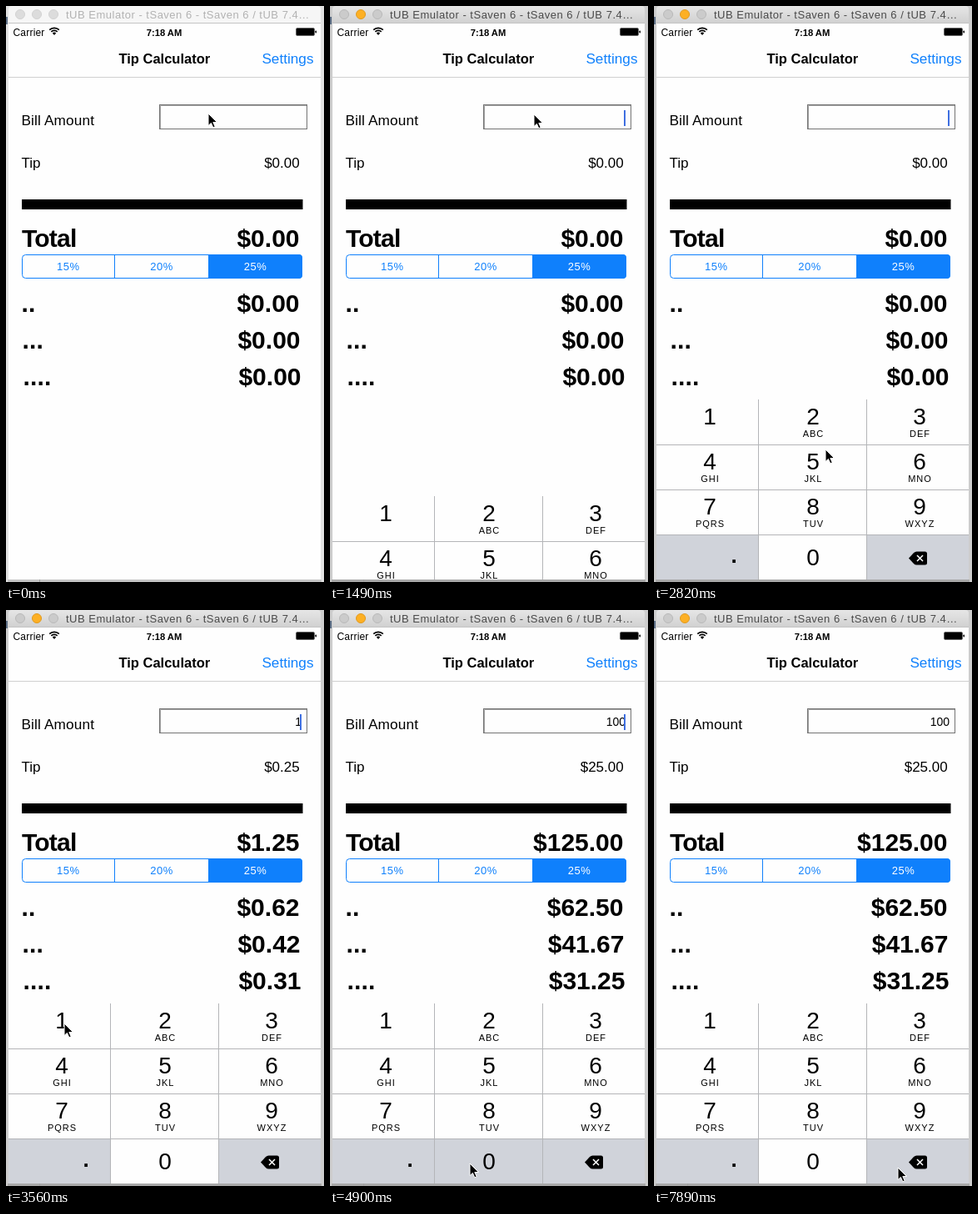
These frames come from a looping animation (382 by 691 pixels, 8 s). An HTML page:

```html
<!DOCTYPE html>
<html lang="en">
<head>
<meta charset="utf-8">
<title>Tip Calculator</title>
<style>
  html, body { margin: 0; width: 100%; height: 100%; overflow: hidden; background: #e6e6e6; }
  svg { display: block; width: 100vw; height: 100vh; }
  text { font-family: "Liberation Sans", Arial, sans-serif; font-size: 17px; white-space: pre; }
  .bold { font-weight: 700; }
  .big { font-weight: 700; font-size: 30px; }
  .end { text-anchor: end; }
  .mid { text-anchor: middle; }
  .seg { font-size: 13px; letter-spacing: .5px; }
  .digit { font-size: 28px; }
  .letters { font-size: 11px; letter-spacing: 1px; }
</style>
</head>
<body>
<svg id="stage" viewBox="0 0 382 691">
  <defs>
    <linearGradient id="bar" x1="0" y1="0" x2="0" y2="1">
      <stop offset="0" stop-color="#e6e6e6"/>
      <stop offset="1" stop-color="#d0d0d0"/>
    </linearGradient>
    <clipPath id="screen"><rect x="3" y="21" width="375" height="667"/></clipPath>
  </defs>
</svg>
<script>
const LOOP = 8000, STEP = 148.15;
const BLUE = '#0f80fc', KEY_GREY = '#d0d3da', LINE = '#b4b5b8', PAPER = '#fefefe';
const stage = document.getElementById('stage');

function add(parent, tag, attrs, content) {
  const el = document.createElementNS('http://www.w3.org/2000/svg', tag);
  for (const k in attrs) el.setAttribute(k, attrs[k]);
  if (content !== undefined) el.textContent = content;
  parent.appendChild(el);
  return el;
}
const rect = (p, x, y, width, height, fill, more) => add(p, 'rect', { x, y, width, height, fill, ...more });
const label = (p, x, y, cls, content, more) => add(p, 'text', { x, y, class: cls, ...more }, content);
const path = (p, d, more) => add(p, 'path', { d, ...more });

// Window frame
const backdrop = rect(stage, 0, 0, 382, 691, '#e6e6e6');
const shadow = rect(stage, 2, 688, 377, 3, '#c0c0c0');
rect(stage, 0, 13, 2, 9, '#5d6f86');
rect(stage, 40, 688, 1, 3, '#a0a0a0');
const titleBar = path(stage, 'M3 21V4a4 4 0 0 1 4-4H374a4 4 0 0 1 4 4V21Z');
const lights = [17, 37, 57].map(cx => add(stage, 'circle', { cx, cy: 10, r: 5.5, 'stroke-width': 1 }));
const title = label(stage, 72, 15, '', 'tUB Emulator - tSaven 6 - tSaven 6 / tUB 7.4…',
  { style: 'font-size:13px;letter-spacing:.5px' });
rect(stage, 3, 20, 375, 1, '#c4c4c4');
rect(stage, 3, 21, 375, 667, PAPER);

// Status bar
label(stage, 8.5, 35.5, '', 'Carrier', { style: 'font-size:12px;letter-spacing:.2px' });
for (const r of [8.2, 5.2]) {
  const d = r * .707;
  path(stage, `M${58 - d} ${34.5 - d}A${r} ${r} 0 0 1 ${58 + d} ${34.5 - d}`,
    { fill: 'none', stroke: '#000', 'stroke-width': 1.7 });
}
path(stage, 'M58 35L55.8 32.6A3.1 3.1 0 0 1 60.2 32.6Z');
label(stage, 190, 35.5, 'bold mid', '7:18 AM', { style: 'font-size:11.2px' });
rect(stage, 348.5, 26.5, 22, 9, '#000', { rx: 1.5, stroke: '#666' });
rect(stage, 371.5, 29.5, 1.5, 3, '#000', { rx: .7 });

// Navigation bar
label(stage, 190.3, 69, 'bold mid', 'Tip Calculator', { style: 'font-size:16.5px' });
label(stage, 369.5, 69, 'end', 'Settings', { fill: BLUE, style: 'font-size:17.2px' });
rect(stage, 3, 85, 375, 1, '#d0d0d0');

// Form
label(stage, 18.5, 143, '', 'Bill Amount', { style: 'font-size:17.2px;letter-spacing:.15px' });
rect(stage, 184.5, 118.5, 177, 29, PAPER, { stroke: '#747474' });
path(stage, 'M185.5 147V119.500H361', { fill: 'none', stroke: '#a2a2a2' });
const bill = label(stage, 355, 139, 'end', '', { style: 'font-size:14px' });
const caret = rect(stage, 353, 125, 2, 19, '#3f6fe0');
label(stage, 18.5, 194, '', 'Tip');
const tip = label(stage, 352.7, 194, 'end');
rect(stage, 19, 232, 337.5, 12, '#000');
label(stage, 19, 289, 'big', 'Total', { style: 'letter-spacing:-.8px' });
const total = label(stage, 352.5, 289, 'big end');
const shares = [2, 3, 4].map((n, i) => {
  label(stage, 18.5 + i, 367 + 44 * i, 'big', '.'.repeat(n), { style: 'letter-spacing:.2px' });
  return { n, el: label(stage, 352.5 + i, 367 + 44 * i, 'big end') };
});

// Tip rate control
rect(stage, 19.5, 298.5, 336, 28, 'none', { rx: 4, stroke: BLUE });
path(stage, 'M243 298H352a4 4 0 0 1 4 4V323a4 4 0 0 1-4 4H243Z', { fill: BLUE });
rect(stage, 130, 298, 1, 29, BLUE);
['15%', '20%', '25%'].forEach((s, i) =>
  label(stage, 74.7 + 112.4 * i, 317, 'seg mid', s, { fill: i < 2 ? BLUE : '#fff' }));

// Keypad, drawn from its own top edge
const clip = add(stage, 'g', { 'clip-path': 'url(#screen)' });
const pad = add(clip, 'g', {});
const edges = [3, 125.5, 255.5, 378], centers = [67, 191, 319];
const words = ['', 'ABC', 'DEF', 'GHI', 'JKL', 'MNO', 'PQRS', 'TUV', 'WXYZ'];
const keys = {};
['1', '2', '3', '4', '5', '6', '7', '8', '9', '.', '0', 'del'].forEach((name, i) => {
  const col = i % 3, y = 54 * Math.floor(i / 3);
  const fill = name === '.' || name === 'del' ? KEY_GREY : PAPER;
  keys[name] = rect(pad, edges[col], y, edges[col + 1] - edges[col], 54, fill);
  if (name === '.') label(pad, 96, 196, 'bold mid', '.', { style: 'font-size:26px' });
  else if (name !== 'del') label(pad, centers[col], y + (i < 9 ? 29.5 : 37), 'digit mid', name);
  if (words[i]) label(pad, centers[col] + .5, y + 45, 'letters mid', words[i]);
});
path(pad, 'M306 190.5L312 184Q313.500 182.500 315.500 182.500H325.500Q328 182.500 328 185V196Q328 198.500 325.500 198.500H315.500Q313.500 198.500 312 197Z');
path(pad, 'M316 187l7 7m0-7l-7 7', { stroke: '#fff', 'stroke-width': 1.5 });
for (const y of [54, 108, 162]) rect(pad, 3, y, 375, 1, LINE);
for (const x of [125, 255]) rect(pad, x, 0, 1, 216, LINE);

const pointer = path(stage, 'M0 0V14.500L3.400 11.400L5.800 16.800L8.200 15.700L5.800 10.500H10.500Z',
  { fill: '#000', stroke: '#fff', 'stroke-width': 1, 'stroke-linejoin': 'round' });

// Bill text from a given time, with the start of its caret cycle
const entries = [[1460, '', 1380], [3390, '1', 3310], [4430, '10', 4350], [4880, '100', 4885]];
const presses = [['1', 3390, 3540], ['0', 4880, 5030]];
const route = [
  [0, 243, 129], [148, 245, 130], [1850, 245, 130], [2519, 232, 500], [2815, 206, 532],
  [3111, 70, 496], [3556, 70, 496], [4148, 168, 664], [5990, 168, 664], [6666, 293, 669]
];

const money = v => '$' + Math.max(0, v - 1e-9).toFixed(2);
const smooth = u => u * u * (3 - 2 * u);

function pointerAt(t) {
  const i = route.findIndex(p => p[0] > t);
  if (i < 0) return route[route.length - 1].slice(1);
  const [t0, x0, y0] = route[i - 1], [t1, x1, y1] = route[i];
  const u = smooth((t - t0) / (t1 - t0));
  return [Math.round(x0 + (x1 - x0) * u), Math.round(y0 + (y1 - y0) * u)];
}

function caretAlpha(age) {
  const p = age % 1000;
  if (p < 100 && age >= 1000) return p / 100;
  return Math.max(0, Math.min(1, (675 - p) / 140));
}

function draw(time) {
  const t = Math.floor(time / STEP) * STEP;
  const active = t > 580;
  backdrop.setAttribute('fill', active ? '#cdcdcd' : '#e2e2e2');
  shadow.setAttribute('fill', active ? '#a8a8a8' : '#c4c4c4');
  titleBar.setAttribute('fill', active ? 'url(#bar)' : '#f6f6f6');
  title.setAttribute('fill', active ? '#4a4a4a' : '#b2b2b2');
  lights.forEach((el, i) => {
    const lit = active && i === 1;
    el.setAttribute('fill', lit ? '#fdb024' : active ? '#cbcbcb' : '#dcdcdc');
    el.setAttribute('stroke', lit ? '#e09a20' : active ? '#b9b9b9' : '#d2d2d2');
  });

  const entry = entries.filter(e => e[0] <= t).pop();
  const amount = entry ? Number(entry[1]) : 0;
  bill.textContent = entry ? entry[1] : '';
  caret.setAttribute('opacity', entry ? caretAlpha(Math.max(0, t - entry[2])) : 0);
  tip.textContent = money(amount * .25);
  total.textContent = money(amount * 1.25);
  for (const s of shares) s.el.textContent = money(amount * 1.25 / s.n);

  const drop = t < 1460 ? 216 : Math.round(117 * Math.exp(-(t - 1481) / 70));
  pad.setAttribute('transform', `translate(0 ${472 + drop})`);
  for (const [name, from, to] of presses)
    keys[name].setAttribute('fill', t >= from && t < to ? KEY_GREY : PAPER);

  pointer.setAttribute('transform', `translate(${pointerAt(t).join(' ')})`);
}

const start = performance.now();
function tick() {
  draw((performance.now() - start) % LOOP);
  requestAnimationFrame(tick);
}
tick();
</script>
</body>
</html>
```
